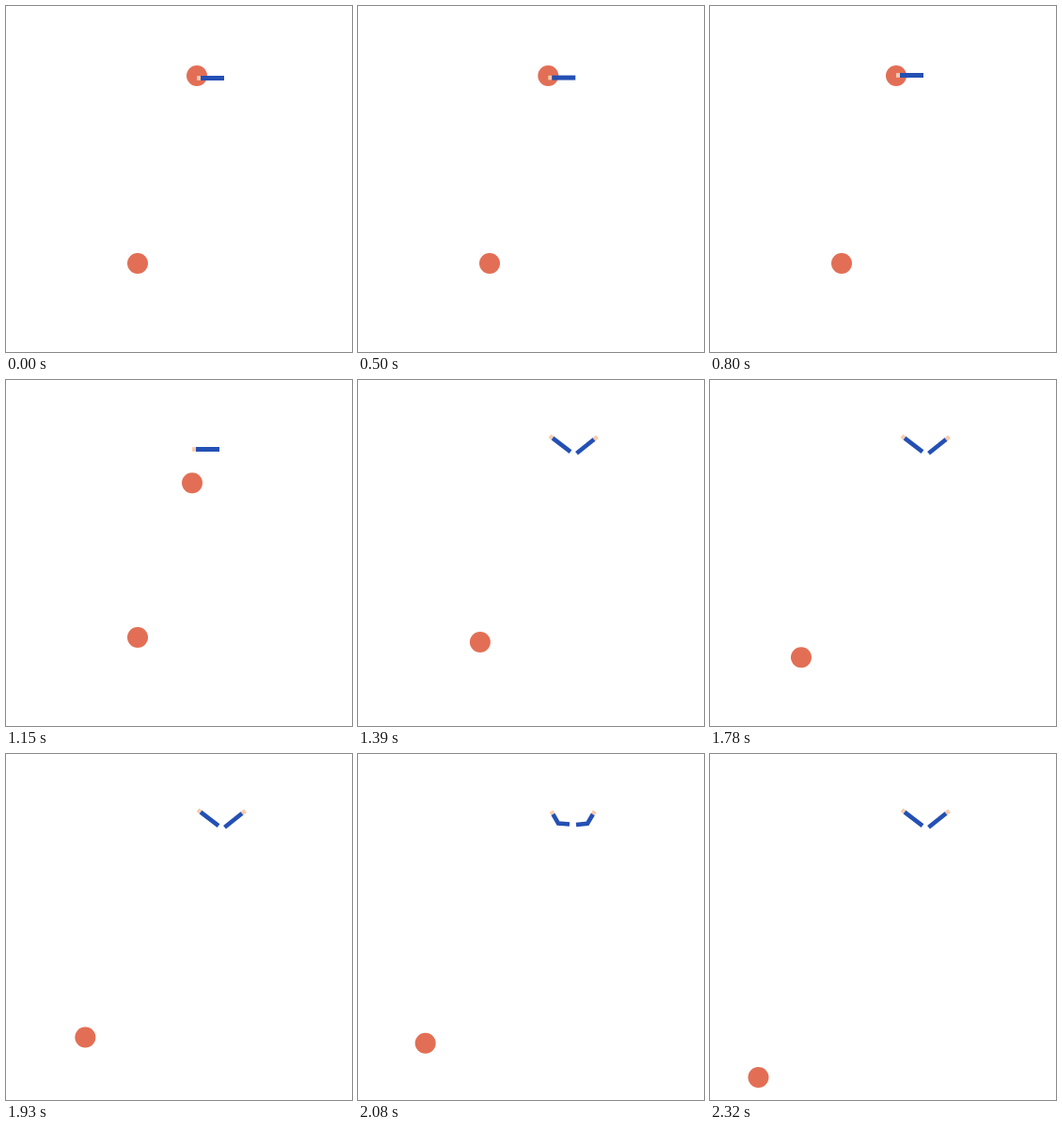
An HTML page for the animation above (2350 ms loop, 368 by 367 pixels).

```html
<!DOCTYPE html>
<html lang="en">
<head>
<meta charset="utf-8">
<title>Marble run</title>
<style>
  html, body { margin: 0; width: 100%; height: 100%; overflow: hidden; background: #fff; }
  svg { display: block; width: 100%; height: 100%; }
  circle { fill: #e26f55; }
  path { fill: none; stroke-width: 4.6; }
  .sleeve { stroke: #2450b4; }
  .hand { stroke: #f8cbad; }
</style>
</head>
<body>
<svg viewBox="0 0 368 367">
  <circle id="dropped" r="11"/>
  <circle id="rolling" r="11"/>
  <g id="reach">
    <path class="hand" stroke-width="5" d="M203 76.5h4"/>
    <path class="sleeve" style="stroke-width:5" d="M207 76.5h25"/>
  </g>
  <g id="raised">
    <path class="hand" d="M204 59.2L207 61.7M251 63L254.6 60.2"/>
    <path class="sleeve" d="M207 61.7L226 76.2M232.5 77.8L251 63"/>
  </g>
  <g id="bent">
    <path class="hand" d="M205.6 60.6L207.4 63.8M249.8 64L251.8 60.8"/>
    <path class="sleeve" d="M207.4 63.8L213 73.6L225 74.5M232 75L244 73.8L249.8 64"/>
  </g>
</svg>
<script>
  const LOOP = 2350, TICK = 30;
  const RELEASE = 1000, ROLL = 1270, CHEER = 1300;
  const [dropped, rolling, reach, raised, bent] =
    ['dropped', 'rolling', 'reach', 'raised', 'bent'].map(id => document.getElementById(id));

  const clamp = (v, lo, hi) => Math.min(hi, Math.max(lo, v));
  const ticks = (t, start, size = TICK) => Math.floor((t - start) / size);
  const show = (el, on) => el.setAttribute('visibility', on ? 'visible' : 'hidden');
  const move = (el, x, y) => el.setAttribute('transform', `translate(${x} ${y})`);

  function fallSteps(t) {
    if (t < RELEASE) return 0;
    return t < 1150 ? 1 + ticks(t, RELEASE, 50) : 4 + ticks(t, 1150);
  }

  function draw(t) {
    const pull = clamp(ticks(t, 450, 50), 0, 7) / 7;
    move(reach, -5 * pull, -3 * pull);
    move(dropped, 203 - 5 * pull, 74 + 2.2 * fallSteps(t) ** 2);

    // Rolls down the slope, then drops off its end.
    const roll = Math.max(0, ticks(t, ROLL));
    const off = Math.max(0, roll - 30);
    move(rolling, 140 - 2.53 * roll, 273 + 1.25 * roll + 1.05 * off ** 2);

    const cheering = t >= CHEER;
    const up = ticks(t, CHEER, 3 * TICK) % 2 === 1;
    show(dropped, !cheering);
    show(reach, !cheering);
    show(bent, cheering && !up);
    show(raised, cheering && up);
  }

  const start = performance.now();
  function frame() {
    draw((performance.now() - start) % LOOP);
    requestAnimationFrame(frame);
  }
  frame();
</script>
</body>
</html>
```
